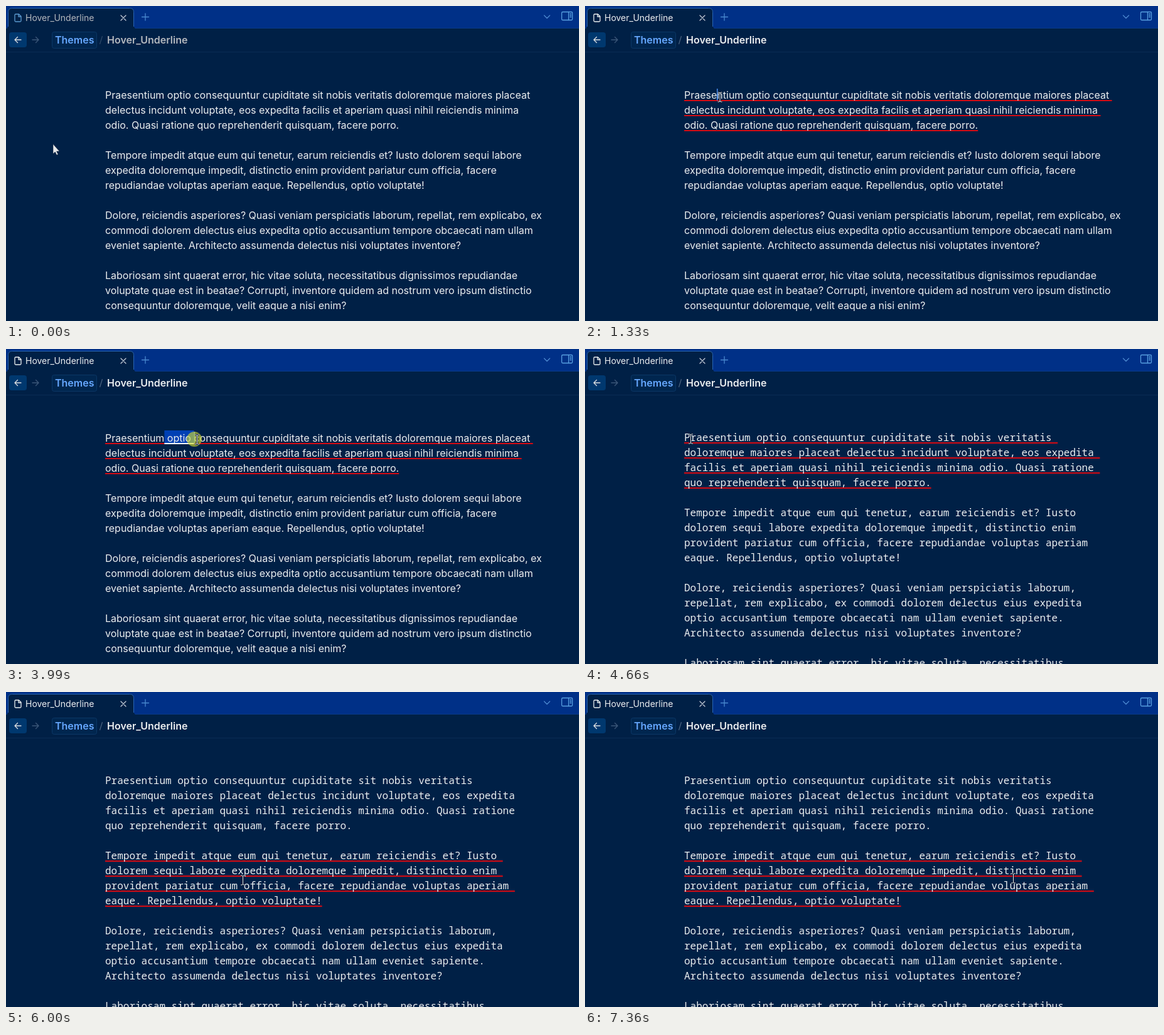
An HTML page for the animation above (7990 ms loop, 913 by 503 pixels).

```html
<!DOCTYPE html>
<html lang="en">
<head>
<meta charset="utf-8">
<title>Hover underline</title>
<style>
html, body { margin: 0; width: 100%; height: 100%; overflow: hidden; background: #002046; }
svg { display: block; }
text { white-space: pre; fill: #eceef0; text-rendering: optimizeLegibility; }
.sans { font: 16px Inter, sans-serif; }
.mono { font: 16px "Noto Sans Mono", monospace; }
.tab { font: 14px Inter, sans-serif; }
.crumb { font: 600 16px Inter, sans-serif; }
.icon { fill: none; stroke-width: 1.3; stroke-linecap: round; stroke-linejoin: round; }
</style>
</head>
<body>
<svg id="stage" width="913" height="503" viewBox="0 0 913 503">
  <rect width="913" height="36" fill="#003087"/>
  <rect y="35" width="913" height="1" fill="#0a3a86"/>
  <path d="M0 36.5Q3 36 3 32V9Q3 3 9 3H198Q204 3 204 9V32Q204 36 208 36.5Z" fill="#002046"/>
  <path d="M3.5 33V9.500Q3.500 3.500 9.500 3.500H197.500Q203.500 3.500 203.500 9.500V33" fill="none" stroke="#2a66b4"/>
  <path id="file" class="icon" d="M20.500 13H15.500Q14 13 14 14.500V23.500Q14 25 15.500 25H22.500Q24 25 24 23.500V16.500ZM20 13.200V17H23.800"/>
  <text id="tabName" class="tab" x="31" y="24">Hover_Underline</text>
  <path class="icon" stroke="#c3cbd6" d="M183 15L191 23M191 15L183 23"/>
  <path class="icon" stroke="#4a88cf" d="M216.500 17.500H227.500M222 12V23"/>
  <path class="icon" stroke="#4a88cf" d="M857.500 15L862 19.500L866.500 15"/>
  <g class="icon" stroke="#5a9fe0">
    <rect x="885.500" y="9.500" width="17" height="13" rx="1.500"/>
    <path d="M896.500 9.500V22.500M898.800 12.500H900.500M898.800 15H900.500M898.800 17.500H900.500"/>
  </g>

  <rect y="73" width="913" height="1" fill="#0b2c54"/>
  <rect x="5" y="42" width="28" height="24" rx="4" fill="#00386f"/>
  <path class="icon" stroke="#dcdee1" d="M24 54H14M18.500 49.500L14 54L18.500 58.500"/>
  <path class="icon" stroke="#3c5779" d="M42 54H52M47.500 49.500L52 54L47.500 58.500"/>
  <rect x="73.500" y="41.500" width="71" height="26" rx="3" fill="#00264f" stroke="#0c3766"/>
  <text class="crumb" x="78" y="60" style="fill:#66a8ff">Themes</text>
  <path id="slash" d="M149.500 61L153.500 48" stroke-width="1.200"/>
  <text id="crumbName" class="crumb" x="161" y="60">Hover_Underline</text>

  <g id="sans"></g>
  <g id="mono"></g>
  <rect id="caret" y="132" width="1.500" height="19" fill="#4a90f4"/>
  <circle id="press" r="12" fill="#d0da32" fill-opacity=".64"/>
  <path id="arrow" d="M75 220.500V236L78.300 233L80.800 238L83 237L80.600 232H85.200Z" fill="#e8e8e8" stroke="#001833" stroke-width=".5"/>
  <g id="beam" fill="none">
    <path d="M-3.500 -7.500H-1L0 -6.500L1 -7.500H3.500M0 -6.500V6.500M-3.500 7.500H-1L0 6.500L1 7.500H3.500" stroke="#00122b" stroke-width="2.600"/>
    <path d="M-3.500 -7.500H-1L0 -6.500L1 -7.500H3.500M0 -6.500V6.500M-3.500 7.500H-1L0 6.500L1 7.500H3.500" stroke="#f2f2f2"/>
  </g>
</svg>
<script>
const LOOP = 7990, LEFT = 158, STEP = 24;
const $ = id => document.getElementById(id);

const sansText = [
  `Praesentium optio consequuntur cupiditate sit nobis veritatis doloremque maiores placeat
delectus incidunt voluptate, eos expedita facilis et aperiam quasi nihil reiciendis minima
odio. Quasi ratione quo reprehenderit quisquam, facere porro.`,
  `Tempore impedit atque eum qui tenetur, earum reiciendis et? Iusto dolorem sequi labore
expedita doloremque impedit, distinctio enim provident pariatur cum officia, facere
repudiandae voluptas aperiam eaque. Repellendus, optio voluptate!`,
  `Dolore, reiciendis asperiores? Quasi veniam perspiciatis laborum, repellat, rem explicabo, ex
commodi dolorem delectus eius expedita optio accusantium tempore obcaecati nam ullam
eveniet sapiente. Architecto assumenda delectus nisi voluptates inventore?`,
  `Laboriosam sint quaerat error, hic vitae soluta, necessitatibus dignissimos repudiandae
voluptate quae est in beatae? Corrupti, inventore quidem ad nostrum vero ipsum distinctio
consequuntur doloremque, velit eaque a nisi enim?`
];
const monoText = [
  `Praesentium optio consequuntur cupiditate sit nobis veritatis
doloremque maiores placeat delectus incidunt voluptate, eos expedita
facilis et aperiam quasi nihil reiciendis minima odio. Quasi ratione
quo reprehenderit quisquam, facere porro.`,
  `Tempore impedit atque eum qui tenetur, earum reiciendis et? Iusto
dolorem sequi labore expedita doloremque impedit, distinctio enim
provident pariatur cum officia, facere repudiandae voluptas aperiam
eaque. Repellendus, optio voluptate!`,
  `Dolore, reiciendis asperiores? Quasi veniam perspiciatis laborum,
repellat, rem explicabo, ex commodi dolorem delectus eius expedita
optio accusantium tempore obcaecati nam ullam eveniet sapiente.
Architecto assumenda delectus nisi voluptates inventore?`,
  `Laboriosam sint quaerat error, hic vitae soluta, necessitatibus`
];

// beam: cursor centre; line: underlined paragraph; sel: selected end character
const steps = [
  { at: 0, blur: true, arrow: true },
  { at: 660, blur: true, line: 0, beam: [180, 170] },
  { at: 1330, line: 0, beam: [215, 145.5], caret: 210 },
  { at: 1990, line: 0, beam: [261, 145] },
  { at: 2660, line: 0, beam: [282.5, 142.5], press: [278, 142], sel: 14 },
  { at: 3330, line: 0, beam: [295.5, 143.5], press: [291, 143], sel: 16 },
  { at: 3990, line: 0, beam: [304.5, 144.5], press: [300, 144], sel: 18 },
  { at: 4660, mono: true, line: 0, beam: [168.5, 143.5] },
  { at: 5330, mono: true, beam: [262, 250.5] },
  { at: 6000, mono: true, line: 1, beam: [377.5, 300.5] },
  { at: 6660, mono: true, line: 2, beam: [530, 400.5] },
  { at: 7360, mono: true, line: 1, beam: [682.5, 297.5] }
];

function add(parent, tag, attrs) {
  const el = document.createElementNS("http://www.w3.org/2000/svg", tag);
  for (const k in attrs) el.setAttribute(k, attrs[k]);
  return parent.appendChild(el);
}

// Lays out paragraphs and returns the underline group and text of each one.
function layout(id, paras, base) {
  let y = base;
  return paras.map(para => {
    const rules = add($(id), "g", {});
    const marks = add($(id), "g", {});
    const rows = para.split("\n");
    const texts = rows.map((row, i) => {
      const t = add($(id), "text", { class: id, x: LEFT, y });
      t.textContent = row + (i < rows.length - 1 ? " " : "");
      add(rules, "rect", {
        x: LEFT, y: y + 2, height: 2, fill: "#d60a12",
        width: t.getComputedTextLength()
      });
      y += STEP;
      return t;
    });
    y += STEP;
    return { rules, marks, texts };
  });
}

const sans = layout("sans", sansText, 148);
const mono = layout("mono", monoText, 147);
const first = sans[0];
const mark = add(first.marks, "rect", { y: 130, height: 22, fill: "#0040b4" });
const markRule = add(first.marks, "rect", { y: 150, height: 2, fill: "#ffffff" });

const show = (el, on) => { el.style.display = on ? "" : "none"; };
function place(id, pos) {
  show($(id), pos);
  if (pos) $(id).setAttribute("transform", `translate(${pos})`);
}

function render(s) {
  show($("sans"), !s.mono);
  show($("mono"), s.mono);
  [sans, mono].forEach(set => set.forEach((p, i) => show(p.rules, i === s.line)));

  let caret = s.caret;
  show(first.marks, s.sel);
  if (s.sel) {
    const x = LEFT + first.texts[0].getSubStringLength(0, 11);
    const width = first.texts[0].getSubStringLength(11, s.sel - 11);
    for (const r of [mark, markRule]) {
      r.setAttribute("x", x);
      r.setAttribute("width", width);
    }
    caret = x + width;
  }
  show($("caret"), caret);
  if (caret) $("caret").setAttribute("x", caret);

  $("file").style.stroke = s.blur ? "#5b9ad0" : "#eceef0";
  $("tabName").style.fill = s.blur ? "#b4b8be" : "#eceef0";
  $("crumbName").style.fill = s.blur ? "#b4b8be" : "#eceef0";
  $("slash").style.stroke = s.blur ? "#2d4868" : "#4b6380";
  show($("arrow"), s.arrow);
  place("press", s.press);
  place("beam", s.beam);
}

let current;
const origin = performance.now();
function tick() {
  const t = (performance.now() - origin) % LOOP;
  const s = steps.findLast(step => step.at <= t);
  if (s !== current) render(current = s);
  requestAnimationFrame(tick);
}
tick();
</script>
</body>
</html>
```
